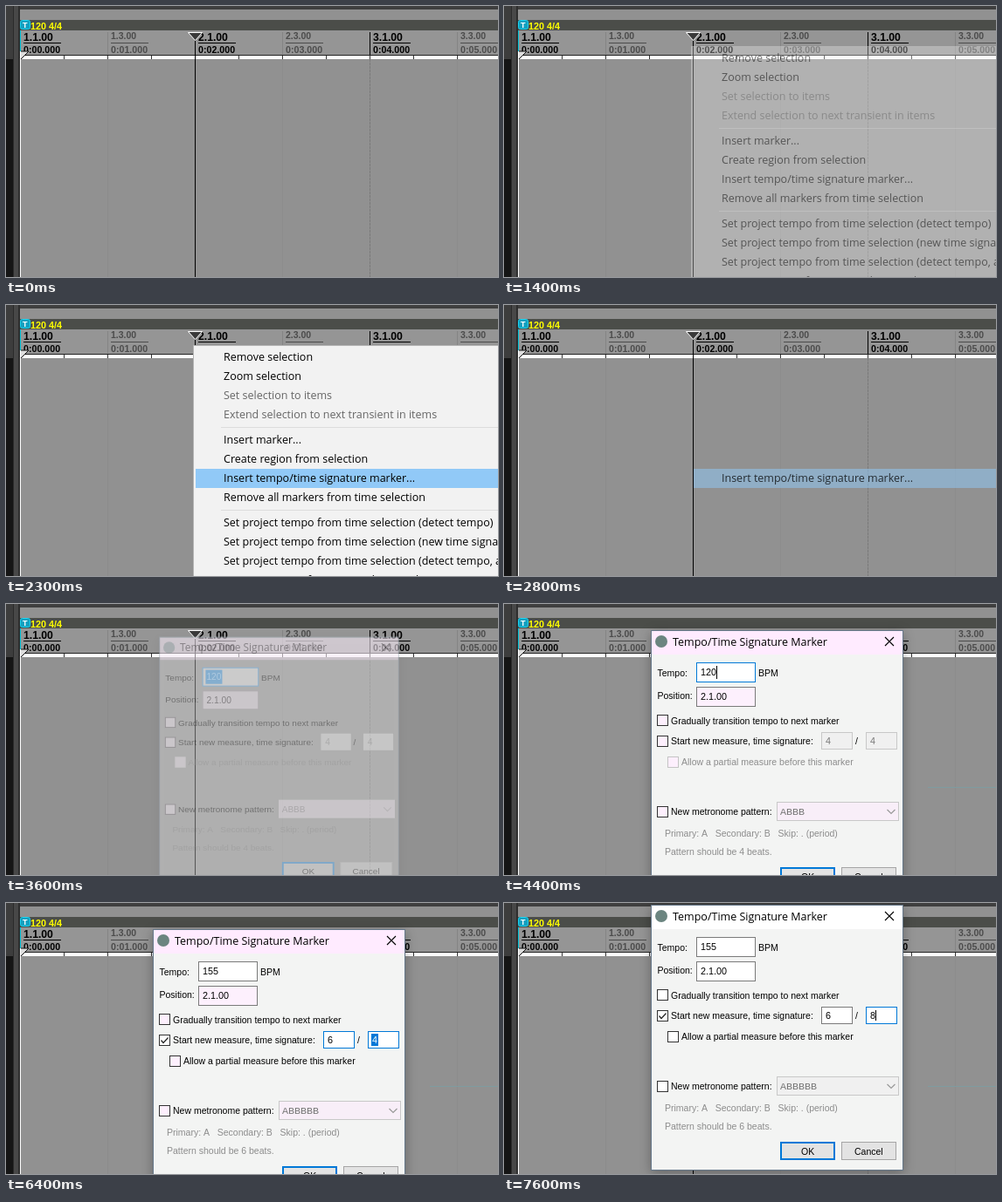
An HTML page with a canvas that plays this animation: 563x311 px, repeating every 8 s.

```html
<!DOCTYPE html>
<html lang="en">
<head>
<meta charset="utf-8">
<title>Tempo marker</title>
<style>
html, body { margin: 0; width: 100%; height: 100%; overflow: hidden; background: #919191; }
canvas { display: block; }
</style>
</head>
<body>
<canvas id="stage" width="563" height="311"></canvas>
<script>
const W = 563, H = 311, LOOP = 8000, STEP = 100;
const g = document.getElementById('stage').getContext('2d');
const UI = '500 12.5px "Open Sans", "Noto Sans", sans-serif';
const ARIAL = '"Liberation Sans", Arial, sans-serif';
const LABEL = '10.5px ' + ARIAL;
const MONO = '11.67px "Liberation Mono", "Courier New", monospace';
const BLUE = '#0078d7';

function rect(x, y, w, h, color) {
  g.fillStyle = color;
  g.fillRect(x, y, w, h);
}

function frame(x, y, w, h, color, size = 1) {
  g.strokeStyle = color;
  g.lineWidth = size;
  g.strokeRect(x + size / 2, y + size / 2, w - size, h - size);
}

function text(str, x, y, font, color) {
  g.font = font;
  g.fillStyle = color;
  g.fillText(str, x, y);
}

function path(points, color, size = 1) {
  g.beginPath();
  points.forEach(([x, y]) => g.lineTo(x, y));
  g.strokeStyle = color;
  g.lineWidth = size;
  g.stroke();
}

// Latest value whose start time has passed.
function at(t, keys) {
  let value = keys[0][1];
  for (const [start, v] of keys) if (t >= start) value = v;
  return value;
}

function drawTimeline(t) {
  rect(0, 0, W, H, '#919191');
  rect(0, 0, W, 4, '#3f3f3f');
  rect(16, 16, W - 16, 12, '#4b4d49');
  rect(16, 28, W - 16, 28, '#959595');
  rect(16, 56, W - 16, 5, '#fff');
  rect(16, 56, W - 16, 1, '#222');

  rect(0, 0, 16, H, '#3d3d3d');
  rect(0, 61, 8, H - 61, '#151515');
  rect(8, 0, 1, H, '#2a2a2a');
  rect(9, 0, 5, H, '#484848');
  rect(14, 0, 2, H, '#2e2e2e');

  for (let x = 66; x < W; x += 50) {
    rect(x, 57, 1, 4, '#333');
    if (x % 100 === 16) rect(x, 61, 1, H - 61, '#8c8c8c');
  }
  for (let i = 0; i < 6; i++) {
    const x = 16 + i * 100, main = i % 2 === 0;
    const color = main ? '#000' : '#4c4c4c';
    const name = (1 + (i >> 1)) + (main ? '.1.00' : '.3.00');
    text(name, x + 4, main ? 40 : 38, 'bold ' + (main ? 12.2 : 10.5) + 'px ' + ARIAL, color);
    text('0:0' + i + '.000', x + 4, 54, 'bold 10.67px ' + ARIAL, color);
    rect(x + 4, 42, 43, 1, color);
    if (i) rect(x, 30, 1, 26, main ? '#000' : '#858585');
  }
  for (let y = 61; y < H; y += 4) rect(416, y, 1, 3, '#7a7a7a');

  // Project start
  rect(16, 28, 1, 24, '#00c4d8');
  rect(16, 52, 1, H - 52, '#fff');
  g.beginPath();
  g.moveTo(17, 52);
  g.lineTo(26, 52);
  g.lineTo(17, 61);
  g.fillStyle = '#ddd';
  g.fill();
  path([[17, 52], [26, 52], [17, 61]], '#111');
  g.beginPath();
  g.roundRect(16.5, 16.5, 11, 10, 2);
  g.fillStyle = '#12a0c0';
  g.fill();
  g.strokeStyle = '#19d3f0';
  g.lineWidth = 1;
  g.stroke();
  text('T', 19, 25, 'bold 9px ' + ARIAL, '#fff');
  text('120 4/4', 28, 27, 'bold 10.8px ' + ARIAL, '#ff0');

  // Edit cursor
  rect(216, 30, 1, H - 30, '#000');
  g.beginPath();
  g.moveTo(208.5, 30.5);
  g.lineTo(224.5, 30.5);
  g.lineTo(216.5, 39.5);
  g.closePath();
  g.fillStyle = '#3a3a3a';
  g.fill();
  g.strokeStyle = '#fff';
  g.stroke();

  if (t >= 3700) rect(485, 210, 78, 1, '#7f9ba0');
}

const menu = [
  'Remove selection', 'Zoom selection', '-Set selection to items',
  '-Extend selection to next transient in items', '',
  'Insert marker...', 'Create region from selection',
  'Insert tempo/time signature marker...', 'Remove all markers from time selection', '',
  'Set project tempo from time selection (detect tempo)',
  'Set project tempo from time selection (new time signature)...',
  'Set project tempo from time selection (detect tempo, align items)',
  'Create measure from time selection (detect tempo)'
];

function drawMenu(t) {
  if (t < 1400 || t >= 3000) return;
  const closing = t >= 2700;
  const fill = at(t, [[1400, 0.32], [1500, 0.75], [1600, 1], [2700, 0.8], [2800, 0.52], [2900, 0.22]]);
  const ink = at(t, [[1400, 0.52], [1500, 0.85], [1600, 1], [2700, 0.9], [2800, 0.75], [2900, 0.35]]);
  const hot = at(t, [[0, -1], [1800, 1], [1900, 3], [2000, 5], [2200, 6], [2300, 7]]);
  g.globalAlpha = fill;
  if (!closing) {
    rect(214, 46, W - 214, H - 46, '#f2f2f2');
    frame(214, 46, W, H, '#b4b4b4');
  }
  let y = 49;
  menu.forEach((item, i) => {
    if (!item) {
      g.globalAlpha = fill;
      if (!closing) rect(246, y + 3, W - 246, 1, '#dcdcdc');
      y += 7;
      return;
    }
    if (!closing || i === hot) {
      g.globalAlpha = fill;
      if (i === hot) rect(217, y, W - 217, 22, '#91c9f7');
      g.globalAlpha = ink;
      const off = item[0] === '-';
      text(off ? item.slice(1) : item, 249, y + 15, UI, off ? '#666' : '#000');
    }
    y += 22;
  });
  g.globalAlpha = 1;
}

function check(x, y, on, state, pink) {
  const color = state === 'off' ? '#c4c4c4' : state === 'hot' ? BLUE : '#333';
  rect(x, y, 13, 13, pink ? '#fdeffd' : '#fff');
  frame(x, y, 13, 13, color);
  if (on) path([[x + 2.5, y + 6.5], [x + 5, y + 9.5], [x + 10.5, y + 3.5]], '#222', 1.2);
}

function field(x, y, w, h, str, o) {
  rect(x, y, w, h, o.off ? '#f0f0f0' : o.pink ? '#fdf0fd' : '#fff');
  frame(x, y, w, h, o.off ? '#c8c8c8' : o.focus ? BLUE : '#7a7a7a');
  const font = '10.8px ' + ARIAL, base = y + h / 2 + 3.5;
  g.font = font;
  const len = g.measureText(str).width;
  if (o.selected) rect(x + 4, y + 3, len + 2, h - 6, BLUE);
  text(str, x + 5, base, font, o.off ? '#777' : o.selected ? '#fff' : '#000');
  if (o.caret) rect(Math.round(x + 5 + len), y + 4, 1, h - 8, '#000');
}

function button(x, str, tx, main) {
  rect(x, 272, 63, 21, '#e3e3e3');
  frame(x, 272, 63, 21, main ? BLUE : '#a5a5a5', main ? 2 : 1);
  text(str, tx, 286.5, LABEL, '#000');
}

function drawDialog(t) {
  if (t < 3600) return;
  const pink = t < 7500;
  const on = t >= 5300;
  const beats = t >= 5800 ? 6 : 4;
  const grey = '#8c8c8c';

  g.save();
  g.globalAlpha = at(t, [[3600, 0.35], [3700, 0.8], [3800, 1]]);
  const scale = at(t, [[3600, 0.95], [3700, 0.985], [3800, 1]]);
  const top = at(t, [[3600, 30], [7500, 12], [7600, 2]]);
  g.translate(312.5, top + 152);
  g.scale(scale, scale);
  g.translate(-312.5, -152);

  g.shadowColor = 'rgba(0,0,0,' + (t < 4000 ? 0.15 : 0.3) + ')';
  g.shadowBlur = 12;
  g.shadowOffsetY = 3;
  rect(168, 0, 289, 305, '#f3f4f3');
  g.shadowColor = 'transparent';
  rect(169, 1, 287, 27, pink ? '#ffebff' : '#fff');
  frame(168, 0, 289, 305, '#66788a');

  g.beginPath();
  g.arc(180, 13, 7, 0, Math.PI * 2);
  g.fillStyle = '#6b8580';
  g.fill();
  text('Tempo/Time Signature Marker', 193, 17.5, UI, '#000');
  path([[436, 8], [446, 18]], '#000', 1.1);
  path([[446, 8], [436, 18]], '#000', 1.1);

  text('Tempo:', 175.5, 53, LABEL, '#000');
  text('BPM', 291, 53, LABEL, '#000');
  text('Position:', 175.5, 79, LABEL, '#000');
  const tempo = at(t, [[0, '120'], [4600, '12'], [4700, '1'], [4900, '15'], [5000, '155']]);
  field(220, 37, 68, 23, tempo, {
    focus: t < 5300, selected: t < 4400, caret: t >= 4400 && t < 5300
  });
  field(220, 65, 68, 23, '2.1.00', { pink });

  check(175, 97, false, '', pink);
  text('Gradually transition tempo to next marker', 191, 107.5, LABEL, '#000');
  check(175, 121, on, t >= 5200 && t < 5500 ? 'hot' : '', pink && !on);
  text('Start new measure, time signature:', 191, 131, LABEL, '#000');
  check(187, 145, false, on ? (t === 6200 ? 'hot' : '') : 'off', pink);
  text('Allow a partial measure before this marker', 203, 155, LABEL, on ? '#000' : grey);

  field(363, 117, 36, 20, at(t, [[0, '4'], [5700, ''], [5800, '6']]), {
    off: !on,
    focus: t >= 5500 && t < 7100,
    selected: t >= 5600 && t < 5700,
    caret: t >= 5500 && t < 6200 && t !== 5600
  });
  text('/', 402, 131, LABEL, '#000');
  field(414, 117, 36, 20, at(t, [[0, '4'], [6700, ''], [6800, '8']]), {
    off: !on,
    focus: t >= 6200,
    selected: t >= 6400 && t < 6700,
    caret: t >= 6200 && !(t >= 6400 && t < 6700)
  });

  check(175, 202, false, '', pink);
  text('New metronome pattern:', 191, 212, LABEL, '#000');
  rect(312, 197, 140, 22, pink ? '#f8eef8' : '#f0f0f0');
  frame(312, 197, 140, 22, '#c8c8c8');
  text('A' + 'B'.repeat(beats - 1), 316, 212, MONO, '#777');
  path([[438.5, 206], [443, 210.5], [447.5, 206]], '#999', 1.2);
  text('Primary: A   Secondary: B   Skip: . (period)', 184, 236.5, LABEL, grey);
  text('Pattern should be ' + beats + ' beats.', 184, 258, LABEL, grey);

  button(316, 'OK', 340, true);
  button(386, 'Cancel', 401, false);
  g.restore();
}

function draw(now) {
  const t = Math.floor((now % LOOP) / STEP) * STEP;
  drawTimeline(t);
  drawMenu(t);
  drawDialog(t);
  requestAnimationFrame(draw);
}
requestAnimationFrame(draw);
</script>
</body>
</html>
```
